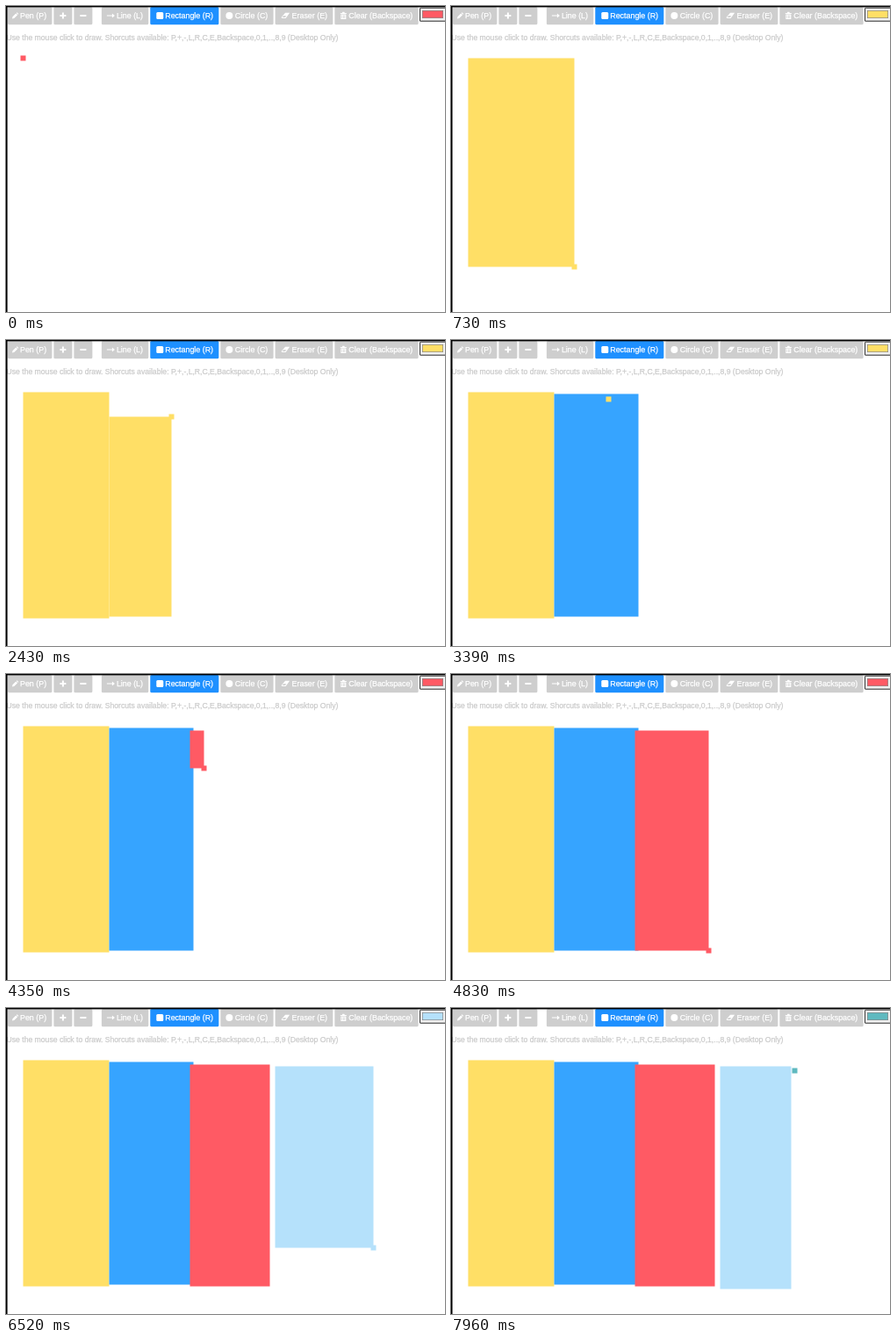
Write an HTML page with a canvas that moves like this. It is 500 px wide and 349 px high and loops after 8000 ms.

```html
<!DOCTYPE html>
<html lang="en">
<head>
<meta charset="utf-8">
<title>Drawing board</title>
<style>
  html, body { margin: 0; width: 100%; height: 100%; overflow: hidden; background: #fff; }
  canvas { display: block; width: 100vw; height: 100vh; }
</style>
</head>
<body>
<canvas id="board" width="500" height="349"></canvas>
<script>
const ctx = document.getElementById('board').getContext('2d');
const LOOP = 8000, STEP = 120;
const RED = '#ff5a64', YELLOW = '#ffdf66', BLUE = '#36a4ff', SKY = '#b5e1fb', TEAL = '#5fb9bf';
const GRAY = '#cecece', ACTIVE = '#1e90ff';
const FONT = '"Liberation Sans", Arial, sans-serif';

// Each move passes its points at even intervals until the next move starts.
// A drag pulls a bar from the place where the move before it ended.
const moves = [
  { start: 0, drag: true, points: [[131, 303], [131, 303], [200, 260], [110, 221], [117, 317]] },
  { start: 1710, points: [[117, 315]] },
  { start: 2070, drag: true, points: [[184, 91], [213, 61], [213, 61]] },
  { start: 3030, points: [[156, 71], [209, 64]] },
  { start: 4230, drag: true, points: [[240, 150], [286, 313], [300, 317]] },
  { start: 4950, points: [[339, 190], [306, 66]] },
  { start: 5550, drag: true, points: [[395, 268], [416, 271], [419, 274], [387, 320]] },
  { start: 7000, points: [[398, 170], [390, 62]] }
];
let origin = [19, 59];
moves.forEach((move, i) => {
  move.end = moves[i + 1]?.start ?? LOOP;
  move.points.unshift(origin);
  origin = move.points.at(-1);
});

const colors = [
  [0, RED], [730, YELLOW], [3030, BLUE], [3270, YELLOW], [3990, RED], [5550, SKY], [7240, TEAL]
];
const colorAt = t => colors.findLast(([from]) => from <= t)[1];

// The picture advances in even steps, with a pause before each run
const runs = [[0, 4], [730, 1], [980, 2], [1350, 39], [6160, 16]];
function stepTime(t) {
  const [from, count] = runs.findLast(run => run[0] <= t);
  return from + STEP * Math.min(count - 1, Math.floor((t - from) / STEP));
}

function pointOn({ start, end, points }, t) {
  const last = points.length - 1;
  const progress = Math.min(1, (t - start) / (end - start)) * last;
  const i = Math.min(last - 1, Math.floor(progress));
  return points[i].map((v, axis) => Math.round(v + (points[i + 1][axis] - v) * (progress - i)));
}

function fill(color, x, y, w, h) {
  ctx.fillStyle = color;
  ctx.fillRect(x, y, w, h);
}

function roundRect(x, y, w, h, r) {
  ctx.beginPath();
  ctx.roundRect(x, y, w, h, r);
  ctx.fill();
}

function text(label, x, y, size, color) {
  ctx.font = `${size}px ${FONT}`;
  ctx.fillStyle = ctx.strokeStyle = color;
  ctx.lineWidth = 0.25;
  ctx.fillText(label, x, y);
  ctx.strokeText(label, x, y);
}

const shape = d => ctx.fill(new Path2D(d));
const icons = {
  pen: () => shape('M5 14.5l.5-2.2 3.8-3.8 1.8 1.8-3.8 3.8zM9.8 8l.8-.8 1.8 1.8-.8.8z'),
  plus: () => shape('M7 10h2.5V7.5h2V10H14v2h-2.5v2.5h-2V12H7z'),
  minus: () => shape('M7 10h7v2H7z'),
  arrow: () => shape('M6 10.4h6V8.6l3 2.4-3 2.4v-1.8H6z'),
  square: () => roundRect(7, 7, 8, 8, 1.5),
  circle: () => roundRect(6, 7, 8, 8, 4),
  eraser: () => {
    shape('M7 13l4.5-5.2h5L12 14H7.6z');
    ctx.fillStyle = GRAY;
    shape('M8 13l1.5-1.8h3.2L11.4 13z');
  },
  trash: () => {
    shape('M6.5 8h2L9 6.7h2l.5 1.3h2v1h-7zM7 9.6h6V15H7z');
    for (let x = 8.2; x < 12; x += 1.5) fill(GRAY, x, 10.4, 0.6, 3.6);
  }
};

const buttons = [
  { icon: 'pen', label: 'Pen (P)', indent: 14 },
  { icon: 'plus' },
  { icon: 'minus' },
  { icon: 'arrow', label: 'Line (L)', indent: 17, space: 8.5 },
  { icon: 'square', label: 'Rectangle (R)', indent: 17, active: true },
  { icon: 'circle', label: 'Circle (C)', indent: 16.5 },
  { icon: 'eraser', label: 'Eraser (E)', indent: 19 },
  { icon: 'trash', label: 'Clear (Backspace)', indent: 16 }
];

function drawToolbar(color) {
  const size = 8.9;
  ctx.save();
  ctx.translate(2, 0);
  for (const { icon, label = '', indent = 14.7, space = 0, active } of buttons) {
    ctx.font = `${size}px ${FONT}`;
    const width = indent + ctx.measureText(label).width + 6.3;
    ctx.translate(space, 0);
    ctx.fillStyle = active ? ACTIVE : GRAY;
    roundRect(0, 1, width, 20.3, 1.5);
    ctx.fillStyle = '#fff';
    icons[icon]();
    text(label, indent, 14, size, '#fff');
    ctx.translate(width + 2, 0);
  }
  ctx.restore();

  ctx.fillStyle = '#333';
  roundRect(471, 1.7, 30, 16, 1.5);
  fill('#f0f0f0', 472, 2.7, 28, 14);
  fill('#888', 474, 5, 24, 9);
  fill(color, 474.7, 5.7, 22.6, 7.6);
}

function drawBar(move, t) {
  const time = Math.min(t, move.end);
  const [x0, y0] = move.points[0];
  const [x, y] = pointOn(move, time);
  fill(colorAt(time), x0, y0, x - x0, y - y0);
}

function draw(t) {
  const color = colorAt(t);
  const started = moves.filter(move => move.start <= t);
  const [x, y] = pointOn(started.at(-1), t);

  fill('#fff', 0, 0, 500, 349);
  drawToolbar(color);
  text('Use the mouse click to draw. Shorcuts available: P,+,-,L,R,C,E,Backspace,0,1,..,8,9 (Desktop Only)',
    0.5, 39, 8.65, '#cacaca');

  ctx.save();
  ctx.translate(0.5, 0.5);
  for (const move of started) if (move.drag) drawBar(move, t);
  fill(color, x - 3, y - 3, 6, 6);
  ctx.restore();

  fill('#000', 0, 0, 1.6, 349);
  fill('#000', 0, 0, 500, 1.4);
}

const start = performance.now();
function tick() {
  draw(stepTime((performance.now() - start) % LOOP));
  requestAnimationFrame(tick);
}
tick();
</script>
</body>
</html>
```
